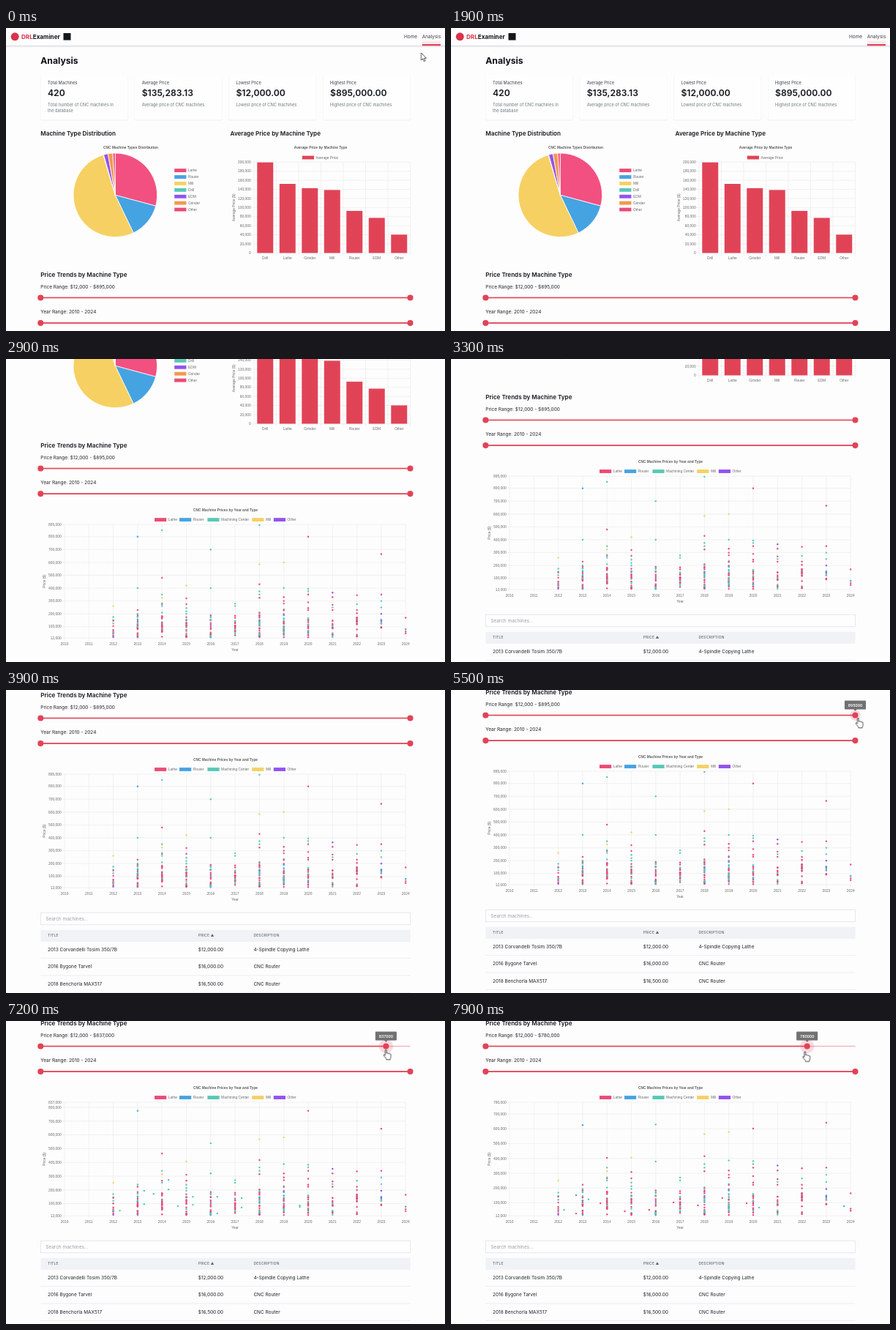
Write an HTML page that moves like this. It is 600 px wide and 414 px high and loops after 8 s.

```html
<!DOCTYPE html>
<html lang="en">
<head>
<meta charset="utf-8">
<title>Machine analysis</title>
<style>
html, body { margin: 0; width: 100%; height: 100%; overflow: hidden; background: #fdfdfe; }
svg { display: block; width: 600px; height: 414px; }
text { font-family: Inter, sans-serif; white-space: pre; }
.chart { font-family: "Liberation Sans", Arial, sans-serif; }
.tip { font-family: Roboto, sans-serif; font-weight: 500; }
#page { animation: scroll 8s linear infinite; }
#cursor { animation: move 8s linear infinite; }
.hot { animation: hot 8s step-end infinite; }
.cold { animation: cold 8s step-end infinite; }
@keyframes scroll {
  0%, 24.375% { transform: translateY(0); }
  30% { transform: translateY(-136px); }
  41.25% { transform: translateY(-285px); animation-timing-function: ease-out; }
  51%, 100% { transform: translateY(-334px); }
}
@keyframes move {
  0%, 7.5% { transform: translate(567.5px, 34px); animation-timing-function: ease-in; }
  18.5% { transform: translate(603px, 62px); }
  53% { transform: translate(603px, 70px); animation-timing-function: ease-out; }
  62%, 80.625% { transform: translate(556.3px, 38px); }
  90% { transform: translate(519.3px, 39px); }
  98.75% { transform: translate(483.8px, 41.5px); }
  100% { transform: translate(479px, 42px); }
}
@keyframes hot { 0% { opacity: 0; } 62%, 100% { opacity: 1; } }
@keyframes cold { 0% { opacity: 1; } 62%, 100% { opacity: 0; } }
</style>
</head>
<body>
<svg viewBox="0 0 600 414">
  <g id="page"></g>
  <g id="cursor">
    <path class="cold" d="M0 0V10L2.3 7.9 3.9 11.6 5.6 10.8 4 7.3H7Z" fill="#fff" stroke="#222" stroke-width=".8"/>
    <path class="hot" d="M-.9 .9Q0 -.5 .9 .9V5Q2.3 4.2 2.9 5.3 4.3 4.7 4.9 5.8 6.5 5.4 6.8 6.8V9.6Q6.8 11.4 5.9 12.4V13.8H.7V12.6L-2.9 8.2Q-3.4 6.7 -2 6.8L-.9 7.9Z" fill="#fff" stroke="#222" stroke-width=".8"/>
  </g>
</svg>
<script>
const RED = '#e14356';
const COLORS = { L: '#ec4a76', R: '#45a3e2', C: '#58c8b6', M: '#f6d062', O: '#9352ee', G: '#f09a4a' };
const XL = 12.15, LG = 8.1, MD = 6.48, SM = 5.67, XS = 4.86;
const LEFT = 47.3, RIGHT = 552.5;
const page = document.getElementById('page');
const parts = [];

const attrs = o => Object.entries(o).map(([k, v]) => ` ${k}="${v}"`).join('');
const tag = (name, o, body = '') => parts.push(`<${name}${attrs(o)}>${body}</${name}>`);
// y is the middle of the capital letters
const text = (x, y, str, size, o = {}) =>
  tag('text', { x, y: (y + size * .363).toFixed(2), 'font-size': size, fill: '#1f2226', ...o }, str);
const rect = (x, y, width, height, fill, o = {}) => tag('rect', { x, y, width, height, fill, ...o });
const line = (x1, y1, x2, y2, o = {}) =>
  tag('line', { x1, y1, x2, y2, stroke: '#e4e4e7', 'stroke-width': .5, ...o });
const label = (x, y, str, anchor = 'start', o = {}) =>
  text(x, y, str, XS, { class: 'chart', fill: '#6a6a6a', 'text-anchor': anchor, ...o });
const chartTitle = (x, y, str) => label(x, y, str, 'middle', { 'font-weight': 700, fill: '#5c5c5c' });
const axisTitle = (x, y, str) =>
  label(x, y, str, 'middle', { transform: `rotate(-90 ${x} ${y})` });
const key = (x, y, str, color) => {
  rect(x, y - 2.4, 16.2, 4.86, color);
  label(x + 18.7, y, str);
};
const heading = (x, y, str) => text(x, y, str, LG, { 'font-weight': 600, fill: '#14171c' });
const money = k => k ? k + ',000' : '0';

function header() {
  rect(0, 24, 600, 2.2, '#ededf0');
  rect(0, 0, 600, 24, '#fdfdfe');
  line(0, 24.2, 600, 24.2, { stroke: '#d6d6da', 'stroke-width': .7 });
  tag('circle', { cx: 12.2, cy: 11.8, r: 5.5, fill: '#d8334a' });
  text(21, 11.6, '<tspan fill="#d8334a">DRL</tspan>Examiner', LG, { 'font-weight': 700, fill: '#14171c' });
  rect(78.5, 7, 10, 9.6, '#14171c');
  text(544, 11.6, 'Home', MD, { fill: '#3a3d42' });
  rect(568.8, 17.6, 25.2, 4.4, RED, { opacity: .1 });
  text(568.8, 11.6, 'Analysis', MD, { fill: '#3a3d42' });
  rect(568.8, 22, 25.2, 2.2, RED);
}

function cards() {
  text(LEFT, 44.2, 'Analysis', XL, { 'font-weight': 700, fill: '#0e1116' });
  [['Total Machines', '420', 'Total number of CNC machines in', 'the database'],
   ['Average Price', '$135,283.13', 'Average price of CNC machines'],
   ['Lowest Price', '$12,000.00', 'Lowest price of CNC machines'],
   ['Highest Price', '$895,000.00', 'Highest price of CNC machines']
  ].forEach(([name, value, ...note], i) => {
    const x = LEFT + i * 128.7;
    rect(x - .4, 64.4, 119.8, 62, '#efeff2', { rx: 2 });
    rect(x, 64, 119, 61.6, '#fefefe', { rx: 2 });
    text(x + 9.7, 75.2, name, SM, { fill: '#3c4046' });
    text(x + 9.7, 88.3, value, XL, { 'font-weight': 600, fill: '#14171c' });
    note.forEach((s, j) => text(x + 9.7, 104.5 + j * 8.1, s, SM, { fill: '#6c7a78' }));
  });
}

function pie() {
  const cx = 149.3, cy = 228.3, r = 57.3;
  heading(LEFT, 144.5, 'Machine Type Distribution');
  chartTitle(170.5, 163.4, 'CNC Machine Types Distribution');
  const at = a => `${cx + r * Math.sin(a * Math.PI / 180)} ${cy - r * Math.cos(a * Math.PI / 180)}`;
  let from = 0;
  [['Lathe', 'L', 105], ['Router', 'R', 154.3], ['Mill', 'M', 343.4], ['Drill', 'C', 344],
   ['EDM', 'O', 350], ['Grinder', 'G', 356.6], ['Other', 'L', 360]].forEach(([name, c, to], i) => {
    const big = to - from > 180 ? 1 : 0;
    tag('path', { d: `M${cx} ${cy}L${at(from)}A${r} ${r} 0 ${big} 1 ${at(to)}Z`,
      fill: c === 'L' ? '#f25080' : COLORS[c], stroke: '#fff', 'stroke-width': .8, 'stroke-linejoin': 'bevel' });
    key(230.2, 194.6 + i * 8.9, name, COLORS[c]);
    from = to;
  });
}

function bars() {
  const x0 = 339, x1 = 552.5, top = 183.2, base = 307.4, w = (x1 - x0) / 7;
  const y = k => base - (base - top) * k / 200;
  heading(306.6, 144.5, 'Average Price by Machine Type');
  chartTitle(430, 163.4, 'Average Price by Machine Type');
  key(404.8, 177, 'Average Price', RED);
  axisTitle(311.7, 245.3, 'Average Price ($)');
  for (let k = 0; k <= 200; k += 20) {
    line(x0 - 3.2, y(k), x1, y(k));
    label(x0 - 4.4, y(k), money(k), 'end');
  }
  for (let i = 0; i <= 7; i++) line(x0 + i * w, top, x0 + i * w, base + 3.2);
  [['Drill', 199.3], ['Lathe', 152], ['Grinder', 142.6], ['Mill', 138.6], ['Router', 92.6],
   ['EDM', 77.2], ['Other', 40.4]].forEach(([name, k], i) => {
    rect(x0 + w * (i + .14), y(k), w * .72, base - y(k), RED);
    label(x0 + w * (i + .5), 314.6, name, 'middle');
  });
}

function slider(y, id) {
  line(LEFT, y, RIGHT, y, { stroke: RED, 'stroke-width': 1.6, opacity: .38 });
  line(LEFT, y, RIGHT, y, { id: id + 'Track', stroke: RED, 'stroke-width': 1.6 });
  tag('circle', { cx: LEFT, cy: y, r: 4.05, fill: RED });
  tag('circle', { id: id + 'Knob', cx: RIGHT, cy: y, r: 4.05, fill: RED });
}

function sliders() {
  heading(LEFT, 337, 'Price Trends by Machine Type');
  text(LEFT, 353.4, '', MD, { id: 'range' });
  slider(368.5, 'price');
  text(LEFT, 388, 'Year Range: 2010 - 2024', MD);
  slider(403.1, 'year');
  parts.push('<g id="hover"><g class="hot">');
  tag('circle', { id: 'halo', cx: 0, cy: 368.5, fill: RED, opacity: .18 });
  tag('path', { d: 'M-14.6 349.6q0-1 1-1h27.2q1 0 1 1v9.8q0 1-1 1H2.2L0 362.8-2.2 360.4H-13.6q-1 0-1-1z', fill: '#717171' });
  text(0, 354.5, '', SM, { id: 'tip', class: 'tip', fill: '#fff', 'text-anchor': 'middle' });
  parts.push('</g></g>');
}

const X0 = 80, STEP = 33.3, TOP = 445, BASE = 600.2, MIN = 12;
const yearX = year => X0 + (year - 2010) * STEP;
const priceY = (k, max) => BASE - (BASE - TOP) * (k - MIN) / (max - MIN);

function scatterFrame() {
  const x1 = yearX(2024);
  chartTitle(300, 425, 'CNC Machine Prices by Year and Type');
  [[203, 'Lathe', 'L'], [237, 'Router', 'R'], [275.4, 'Machining Center', 'C'],
   [336.2, 'Mill', 'M'], [365.8, 'Other', 'O']].forEach(([x, s, c]) => key(x, 438.5, s, COLORS[c]));
  axisTitle(51.8, 522.5, 'Price ($)');
  label((X0 + x1) / 2, 616, 'Year', 'middle');
  for (let year = 2010; year <= 2024; year++) {
    line(yearX(year), TOP, yearX(year), BASE + 3.2);
    label(yearX(year), 607.8, year, 'middle');
  }
  [TOP, BASE].forEach(y => line(X0 - 3.2, y, x1, y));
  label(X0 - 4.4, BASE, money(MIN), 'end');
  label(X0 - 4.4, TOP, '', 'end', { id: 'maxLabel' });
  for (let k = 100; k <= 800; k += 100) {
    parts.push(`<g class="tick" data-k="${k}">`);
    line(X0 - 3.2, 0, x1, 0);
    label(X0 - 4.4, 0, money(k), 'end');
    parts.push('</g>');
  }
  parts.push('<g id="dots"></g>');
}

function table() {
  rect(LEFT, 634.2, RIGHT - LEFT, 16.6, '#fefefe', { stroke: '#d8dadf', 'stroke-width': .6 });
  text(54.2, 642.4, 'Search machines...', MD, { fill: '#9a9da3' });
  rect(LEFT, 657.8, RIGHT - LEFT, 16.2, '#f1f2f5');
  const cols = [57, 262.8, 338.4];
  ['TITLE', 'PRICE ▲', 'DESCRIPTION'].forEach((s, i) =>
    text(cols[i], 665.6, s, XS, { fill: '#5f6570', 'font-weight': 500, 'letter-spacing': .24 }));
  [['2013 Corvandelli Tosim 350/7B', '$12,000.00', '4-Spindle Copying Lathe'],
   ['2016 Bygone Tarvel', '$16,000.00', 'CNC Router'],
   ['2018 Benchorla MAX517', '$16,500.00', 'CNC Router']].forEach((row, j) => {
    row.forEach((s, i) => text(cols[i], 684.5 + j * 23.6, s, MD));
    line(LEFT, 696.4 + j * 23.6, RIGHT, 696.4 + j * 23.6, { stroke: '#dcdee3' });
  });
}

[header, cards, pie, bars, sliders, scatterFrame, table].forEach(f => f());
page.innerHTML = parts.join('');

// Outliers by year (kind + price in thousands), then size, top and floor of the dense cluster
const YEARS = {
  2012: ['M260 C175 C152 L146 C125 L105 L75 L62 C50 L45 L30 O20', 0],
  2013: ['R800 C400 L230 L190 C178 C150 L140', 18, 130],
  2014: ['C850 L480 C350 M325 L275 C260', 22, 195],
  2015: ['M420 L320 L275 C245 C220 C200', 18, 175],
  2016: ['C700 C400 L190 C178', 20, 175],
  2017: ['C280 C260 L185 L170', 18, 145],
  2018: ['C890 M585 L430 C375 C350 L325 L210 C200', 24, 190],
  2019: ['M600 C400 L330 L300 L280 C235 L228', 22, 200],
  2020: ['L800 C395 C375 L350 L290 L245 L230', 20, 175],
  2021: ['O365 L330 L270 C250 L230', 14, 155],
  2022: ['L345 C275 L230 L205', 18, 180],
  2023: ['L665 L350 C300 C250 O200', 9, 180, 90],
  2024: ['L170 L62 L48', 0]
};
// Points that glide in from a neighbouring year when the filter changes
const GLIDES = [
  ['C', 1, 6920, '2012:51 2013:200 2013:100 2014:282 2014:210 2015:155 2015:95 2016:155 2016:30 2017:145 2017:75'],
  ['C', 1, 7100, '2013:177 2014:85 2019:79 2019:90'],
  ['C', 1, 7600, '2012:54 2013:127 2020:70'],
  ['L', -1, 7620, '2013:28 2014:100 2015:44 2016:54 2017:106 2018:85 2019:137 2020:100'],
  ['R', -1, 7620, '2013:157 2024:80']
];
// Points whose price slides: start, end, time, duration
const SLIDES = {
  '2013R800': [800, 578, 7650, 1000],
  '2020L800': [800, 542, 7650, 1000],
  '2014L480': [480, 390, 7650, 1000],
  '2013C400': [400, 190, 6920, 1000],
  '2016C700': [400, 700, 6618, 3465],
  '2016C400': [230, 400, 6800, 2000]
};

let seed = 7;
const rand = () => (seed = seed * 16807 % 2147483647) / 2147483647;
const dots = [];
const addDot = (year, kind, k, extra = {}) => {
  const el = document.createElementNS('http://www.w3.org/2000/svg', 'circle');
  el.setAttribute('r', 1.2);
  el.setAttribute('fill', COLORS[kind]);
  document.getElementById('dots').append(el);
  dots.push({ el, year, k, slide: SLIDES[year + kind + k], ...extra });
};
for (const [year, [high, count, top, floor = 18]] of Object.entries(YEARS)) {
  for (let i = 0; i < count; i++) {
    const k = floor + (top - floor) * rand() ** 1.3, pick = rand();
    const low = k < 55 ? .45 : .72;
    addDot(+year, pick < low ? 'L' : pick < .9 ? 'C' : 'R', k);
  }
  high.split(' ').forEach(s => addDot(+year, s[0], +s.slice(1)));
}
for (const [kind, dir, start, list] of GLIDES) {
  list.split(' ').forEach(s => {
    const [year, k] = s.split(':').map(Number);
    addDot(year, kind, k, { dir, start });
  });
}

const get = id => document.getElementById(id);
const ticks = [...document.querySelectorAll('.tick')];
const remain = (t, start, span = 1000) => (1 - Math.min(1, (t - start) / span)) ** 4;
const maxPrice = t => t < 6450 ? 895 : t < 7200 ? 895 - 58 * (t - 6450) / 750 : 837 - 57 * (t - 7200) / 700;

function draw(t) {
  const max = Math.round(maxPrice(t)), lag = maxPrice(t - 350);
  const knob = LEFT + (RIGHT - LEFT) * (max - MIN) / (895 - MIN);
  get('priceTrack').setAttribute('x2', knob);
  get('priceKnob').setAttribute('cx', knob);
  get('hover').setAttribute('transform', `translate(${knob} 0)`);
  get('halo').setAttribute('r', t < 6400 ? 7.3 : 9.7);
  get('tip').textContent = max * 1000;
  get('range').textContent = `Price Range: $12,000 - $${money(max)}`;
  get('maxLabel').textContent = money(max);
  ticks.forEach(el => {
    const k = +el.dataset.k;
    el.setAttribute('transform', `translate(0 ${priceY(k, max)})`);
    el.style.display = k < max ? '' : 'none';
  });
  dots.forEach(d => {
    let k = d.k, x = yearX(d.year);
    if (d.slide && t >= d.slide[2]) {
      const [a, b, start, span] = d.slide;
      k = b + (a - b) * remain(t, start, span);
    }
    if (d.dir && t >= d.start) x += d.dir * STEP * remain(t, d.start);
    d.el.setAttribute('cx', x);
    d.el.setAttribute('cy', priceY(k, lag));
    d.el.style.display = k > max ? 'none' : '';
  });
}

let begin;
function tick(now) {
  begin ??= now;
  draw((now - begin) % 8000);
  requestAnimationFrame(tick);
}
draw(0);
requestAnimationFrame(tick);
</script>
</body>
</html>
```
